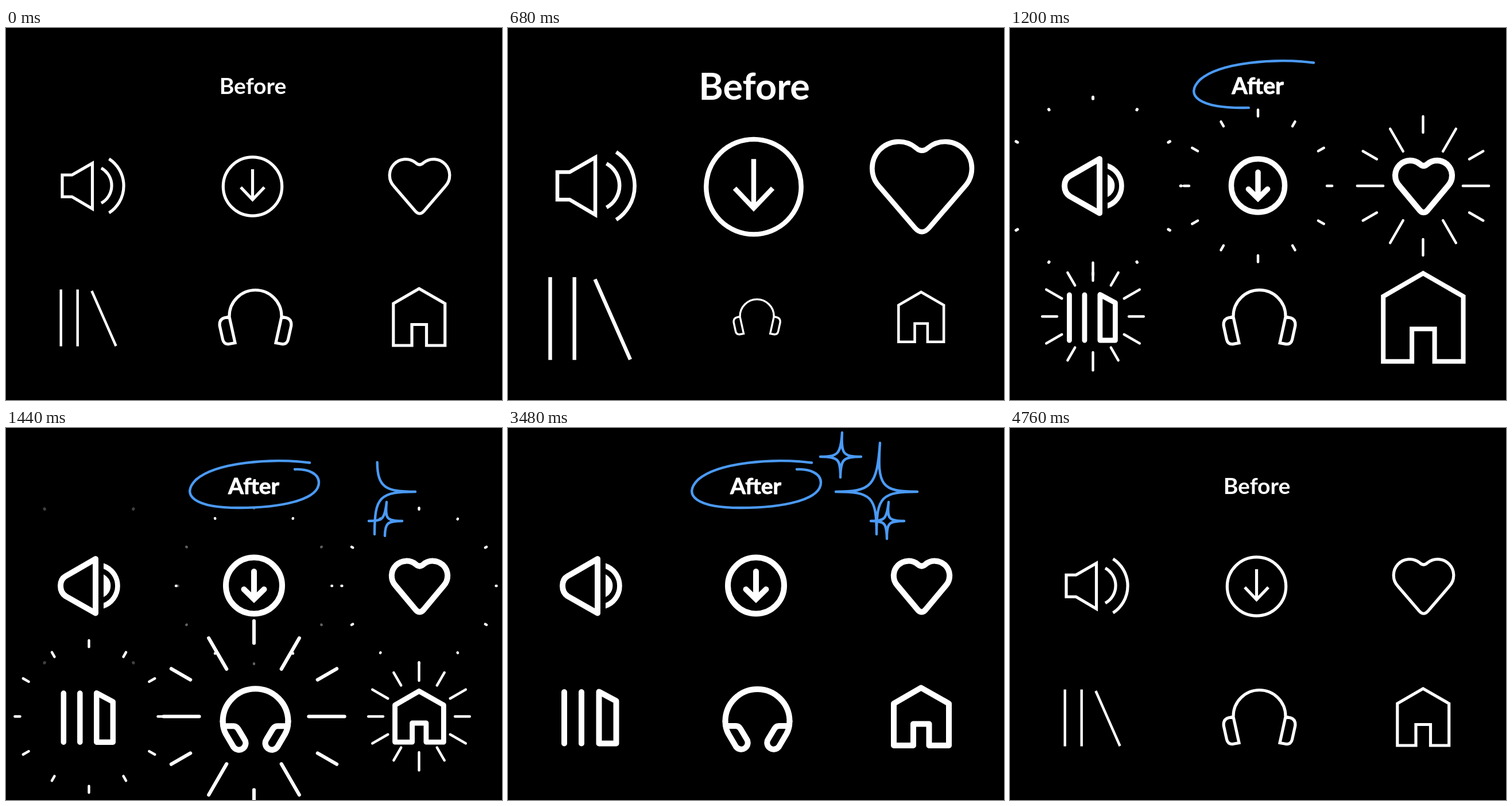
These frames come from a looping animation (864x648 px, 5.6 s). An HTML page:

```html
<!DOCTYPE html>
<html lang="en">
<head>
<meta charset="utf-8">
<title>Icon refresh</title>
<style>
  html, body { margin: 0; width: 100%; height: 100%; overflow: hidden; background: #000; }
  svg { display: block; width: 100vw; height: 100vh; }
  text { font: 700 39px Lato, sans-serif; fill: #fff; stroke: none; text-anchor: middle; }
  .heavy { stroke: #fff; stroke-width: .9; }
  .icon, .rays { fill: none; stroke: #fff; }
  .round { stroke-linecap: round; stroke-linejoin: round; }
  .rays { stroke-linecap: round; }
  .solid { fill: #fff; stroke: none; }
  .ink { fill: none; stroke: #4b9af5; stroke-width: 4.4; stroke-linecap: round; stroke-linejoin: round; }
</style>
</head>
<body>
<svg id="stage" viewBox="0 0 864 648"></svg>
<script>
const LOOP = 5600, FRAME = 40, STAGGER = 120;
const SMALL = .65, BIG = 1.66;
const stage = document.getElementById('stage');

function add(parent, tag, attrs = {}) {
  const node = document.createElementNS('http://www.w3.org/2000/svg', tag);
  for (const key in attrs) node.setAttribute(key, attrs[key]);
  return parent.appendChild(node);
}

// Progress from 0 to 1 between two times.
const span = (t, from, to) => Math.min(Math.max((t - from) / (to - from), 0), 1);
const mix = (a, b, k) => a + (b - a) * k;
const easeIn = (u, power) => u ** power;
const easeOut = (u, power) => 1 - (1 - u) ** power;
const smooth = u => u * u * (3 - 2 * u);

// Scales, with s counted from the moment the new icon takes over.
function oldScale(s) {
  if (s < -560) return mix(1, SMALL, smooth(span(s, -760, -560)));
  if (s < -320) return mix(SMALL, BIG, easeOut(span(s, -560, -320), 2.3));
  return mix(BIG, SMALL, easeIn(span(s, -320, 0), 3.2));
}

function newScale(s) {
  const wobble = Math.sin(2 * Math.PI * span(s, 120, 440) ** .58);
  return mix(SMALL, 1, span(s, 0, 120)) + .05 * wobble;
}

// Rays come in two kinds that alternate around the circle.
const RAYS = [
  { headPower: 2.8, tailStart: 190, tailPower: 3.6, fadeStart: 560 },
  { headPower: 3.6, tailStart: 120, tailPower: 2.7, fadeStart: 460 }
];

const path = (d, cls = '') => `<path d="${d}" class="${cls}"/>`;
const mirrored = (d, axis) => path(d) + `<path d="${d}" transform="translate(${2 * axis} 0) scale(-1 1)"/>`;

const icons = [
  { // speaker
    reach: 155,
    before: path('M98 256H115L150.5 235.5V315L115 294H98Z') +
      path('M166 244A34.8 34.8 0 0 1 166 305') + path('M179.5 228A56 56 0 0 1 179.5 322'),
    after: path('M156 228V322.5L104 293Q95 287 95 275Q95 263 104 258Z') +
      path('M170 235.5A41.5 41.5 0 0 1 170 314.5V304.7A32 32 0 0 0 170 245.3Z', 'solid') +
      path('M170 255A22 22 0 0 1 170 294.5Z', 'solid')
  },
  { // download
    before: '<circle cx="429.5" cy="276" r="51.2"/>' + path('M429.5 246V298M409 277.5L429.5 299L450 277.5'),
    after: '<circle cx="432" cy="274.5" r="49"/>' + path('M432 250V296') +
      '<path d="M414.5 281L432 298L449.5 281" stroke-linejoin="miter"/>'
  },
  { // heart
    before: path('M714 235Q720.5 241 727 235A28 28 0 0 1 765 276L728 319Q720.5 327.5 713 319L676 276A28 28 0 0 1 714 235Z'),
    after: path('M714.5 238Q720.5 243 726.5 238A25.7 25.7 0 0 1 763 274L727 317Q720.5 324 714 317L678 274A25.7 25.7 0 0 1 714.5 238Z')
  },
  { // library
    thin: 4.4,
    before: path('M95.7 455.5V554.5M124.7 455.5V554.5M149.3 458L191.6 554'),
    after: path('M98 460V549.5M128 460V549.5M158.5 459.5L188.5 475.5V549.5H158.5Z')
  },
  { // headphones
    reach: 187,
    before: path('M389 502A45.5 45.5 0 0 1 480 502') +
      mirrored('M389 503L399 548.5L388 550.5Q379.5 551 377.5 542.5L372.3 519Q371 508 380 505Z', 434.5),
    after: path('M378.5 511A56 56 0 0 1 490.5 511') +
      mirrored('M379 519H397Q402 519 405 524L415.5 541.5A11.2 11.2 0 0 1 397 555L384 533Q378.5 523 378.5 511', 434.5)
  },
  { // home
    before: path('M674.8 553V480L719.6 454L764.7 480V553H732.5V516.5H707V553Z'),
    after: path('M672 553V480L719.5 452.5L768 480V553H733.5V515.5H706V553Z')
  }
].map((icon, i) => ({
  x: 144.5 + 287.5 * (i % 3),
  y: i < 3 ? 275 : 502.5,
  swap: 760 + STAGGER * i,
  back: 3840 + STAGGER * i,
  reach: 136,
  thin: 5.2,
  ...icon
}));

const title = {
  x: 431.3, y: 100.5, swap: 1000, back: 3720, reach: 0, thin: 0,
  before: '<text x="430" y="115">Before</text>',
  after: '<text x="431.6" y="115" class="heavy">After</text>'
};

const items = [...icons, title];
for (const item of items) {
  const { x, y, reach } = item;
  item.rays = [];
  if (reach) {
    const group = add(stage, 'g', { class: 'rays', 'stroke-width': 4.4 * reach / 136 });
    for (let i = 0; i < 12; i++) {
      const spoke = add(group, 'g', { transform: `translate(${x} ${y}) rotate(${i * 30})` });
      item.rays.push(add(spoke, 'line'));
    }
  }
  item.old = add(stage, 'g', { class: 'icon', 'stroke-width': item.thin });
  item.old.innerHTML = item.before;
  item.fresh = add(stage, 'g', { class: 'icon round', 'stroke-width': 10 });
  item.fresh.innerHTML = item.after;
}

// Four-pointed sparkle: each side bends towards the centre.
function sparkle(cx, cy, tips) {
  const pull = ([x, y]) => `${mix(x, cx, .88)} ${mix(y, cy, .88)}`;
  let d = 'M' + tips[0].join(' ');
  tips.forEach((tip, i) => {
    const next = tips[(i + 1) % 4];
    d += `C${pull(tip)} ${pull(next)} ${next.join(' ')}`;
  });
  return d;
}

const inks = [
  { d: 'M529 60.5C460 52 365 60 331 90C303 118 330 139 405 139C480 139 545 125 545 95C545 80 527 71 503 72',
    draw: [998, 1320], wipe: [3570, 3920] },
  { d: sparkle(642, 111, [[642, 185], [713, 111], [648, 26], [571, 111]]),
    draw: [1280, 1650], wipe: [3720, 4040] },
  { d: sparkle(659.5, 162, [[632, 162], [663, 129], [690, 162], [660, 193]]),
    draw: [1300, 1490], wipe: [3840, 4080] },
  { d: sparkle(579.5, 50, [[544, 50], [582, 8], [615, 50], [579, 86]]),
    draw: [1540, 1920], wipe: [4040, 4280] }
];
for (const ink of inks) ink.node = add(stage, 'path', { d: ink.d, class: 'ink', pathLength: 1 });

const show = (node, on) => { node.style.display = on ? '' : 'none'; };

function place(node, { x, y }, scale) {
  node.setAttribute('transform', `translate(${x} ${y}) scale(${scale}) translate(${-x} ${-y})`);
}

function drawRay(ray, kind, reach, s) {
  const alpha = 1 - span(s, kind.fadeStart, kind.fadeStart + 160);
  const on = s > 0 && alpha > 0;
  show(ray, on);
  if (!on) return;
  const head = mix(.46, 1, easeOut(span(s, 0, 560), kind.headPower));
  const tail = mix(.46, .995, easeOut(span(s, kind.tailStart, 560), kind.tailPower));
  ray.setAttribute('x1', tail * reach);
  ray.setAttribute('x2', head * reach);
  ray.setAttribute('opacity', alpha);
}

function drawItem(item, t) {
  const s = t - item.swap, r = t - item.back;
  const returned = r >= 160;
  const isNew = s >= 0 && !returned;
  show(item.old, !isNew);
  show(item.fresh, isNew);
  if (isNew) place(item.fresh, item, newScale(s) * mix(1, SMALL, easeIn(span(r, 0, 160), 2)));
  else place(item.old, item, returned ? mix(SMALL, 1, easeOut(span(r, 160, 320), 2)) : oldScale(s));
  item.rays.forEach((ray, i) => drawRay(ray, RAYS[i % 2], item.reach, s));
}

function drawInk({ node, draw, wipe }, t) {
  const end = span(t, ...draw), start = span(t, ...wipe);
  show(node, end > start);
  node.setAttribute('stroke-dasharray', `${Math.max(end - start, 0)} 2`);
  node.setAttribute('stroke-dashoffset', -start);
}

const origin = performance.now();
function render(now) {
  const elapsed = Math.max(now - origin, 0) % LOOP;
  const t = Math.floor(elapsed / FRAME) * FRAME;
  items.forEach(item => drawItem(item, t));
  inks.forEach(ink => drawInk(ink, t));
  requestAnimationFrame(render);
}
render(origin);
</script>
</body>
</html>
```
